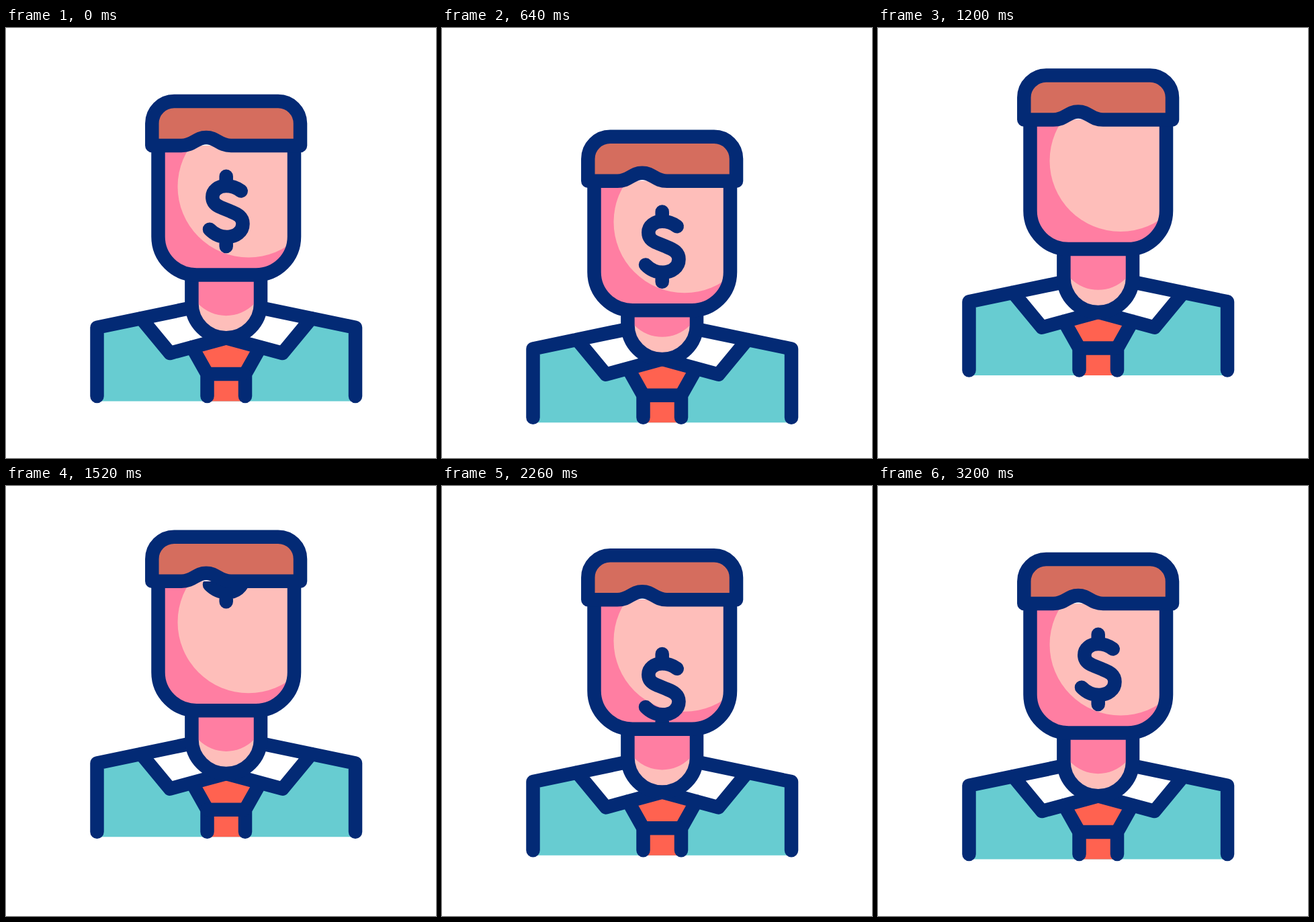
An HTML page for the animation above (3.42 s loop, 640x640 px).

```html
<!DOCTYPE html>
<html lang="en">
<head>
<meta charset="utf-8">
<title>Dollar face</title>
<style>
  html, body { margin: 0; width: 100%; height: 100%; overflow: hidden; background: #fff; }
  svg { display: block; width: 100vw; height: 100vh; }
  .line { fill: none; stroke: #032a75; stroke-width: 20.5; stroke-linecap: round; stroke-linejoin: round; }
</style>
</head>
<body>
<svg viewBox="0 0 640 640">
  <defs>
    <path id="face" d="M226.5 175V310.5a57 57 0 0 0 57 57H372a57 57 0 0 0 57-57V175"/>
    <path id="neckShape" d="M276.4 368V410a51.3 51.3 0 0 0 102.6 0V368"/>
    <clipPath id="faceClip"><use href="#face"/></clipPath>
    <clipPath id="neckClip"><use href="#neckShape"/></clipPath>
    <g id="collar">
      <path fill="#fff" d="M201 432L276 416.5L327.7 461.3L244 484Z"/>
      <path class="line" d="M135.5 548V445.8L276 416.5M201 432L244 484L327.7 461.3M277 475L299.5 515V548"/>
    </g>
  </defs>

  <g id="body">
    <path fill="#67ccd1" d="M135.5 555.5V445.8L276 416.5H379.5L520 445.8V555.5Z"/>
    <path fill="#ff6250" d="M327.7 461.3L277 475L299.5 515V555.5H354V515L378.5 475Z"/>
    <use href="#collar"/>
    <use href="#collar" transform="translate(655.5) scale(-1 1)"/>
    <path class="line" d="M299.5 515H354"/>
    <use href="#neckShape" fill="#febeba"/>
    <path clip-path="url(#neckClip)" fill="#ff7ea2" d="M270 360H385.4V370.5a57.7 57.7 0 0 1-115.4 0Z"/>
    <use href="#neckShape" class="line" style="stroke-linecap:butt"/>
  </g>

  <g id="head">
    <use href="#face" fill="#ff7ea2"/>
    <g clip-path="url(#faceClip)">
      <circle cx="361" cy="236" r="105.5" fill="#febeba"/>
      <path id="dollar" class="line" d="M327.7 220.8V235M327.7 311V325M349.7 242.5C343 237.5 336 235 327.7 235
        C316 235 307.3 242 307.3 251.5C307.3 260.5 313 264.5 321 267.5L334 272.8C345 277 352.5 281.5 352.5 291.5
        C352.5 303 342 311 329 311C318 311 310 307 303 299.7"/>
    </g>
    <use href="#face" class="line"/>
    <path class="line" style="fill:#d56d5e" d="M217.3 175V142a33 33 0 0 1 33-33H405a33 33 0 0 1 33 33V175H335
      c-18 0-21-12-37-12s-19 12-37 12Z"/>
  </g>
</svg>
<script>
  const LOOP = 3420, STEP = 20, DELAY = 200;

  // Segments: [start ms, end ms, from, to]
  const bodyMoves = [[0, 600, 0, 38.4], [600, 1000, 38.4, -38.4], [1000, 2400, -38.4, 0]];
  const headMoves = [[0, 600, 0, 64], [600, 1000, 64, -38.4], [1000, 2400, -38.4, 0]];

  // The dollar leaves through the hair and re-enters at the chin.
  const TOP = -152, BOTTOM = 160;
  const dollarMoves = [
    [600, 1000, 0, TOP],
    [1000, 1400, BOTTOM, TOP],
    [1400, 1800, BOTTOM, TOP],
    [1800, 2400, BOTTOM, TOP],
    [2400, 3000, BOTTOM, 0]
  ];

  const smooth = u => u * u * (3 - 2 * u);

  function valueAt(moves, t) {
    const move = moves.find(([, end]) => t < end) || moves[moves.length - 1];
    const [start, end, from, to] = move;
    const u = Math.min(1, Math.max(0, (t - start) / (end - start)));
    return from + (to - from) * smooth(u);
  }

  function shift(id, y) {
    document.getElementById(id).setAttribute("transform", `translate(0 ${y.toFixed(3)})`);
  }

  function draw(ms) {
    const t = Math.floor((ms % LOOP) / STEP) * STEP - DELAY;
    shift("body", valueAt(bodyMoves, t));
    shift("head", valueAt(headMoves, t));
    shift("dollar", valueAt(dollarMoves, t));
  }

  const begin = performance.now();
  function tick() {
    draw(performance.now() - begin);
    requestAnimationFrame(tick);
  }
  tick();
</script>
</body>
</html>
```
